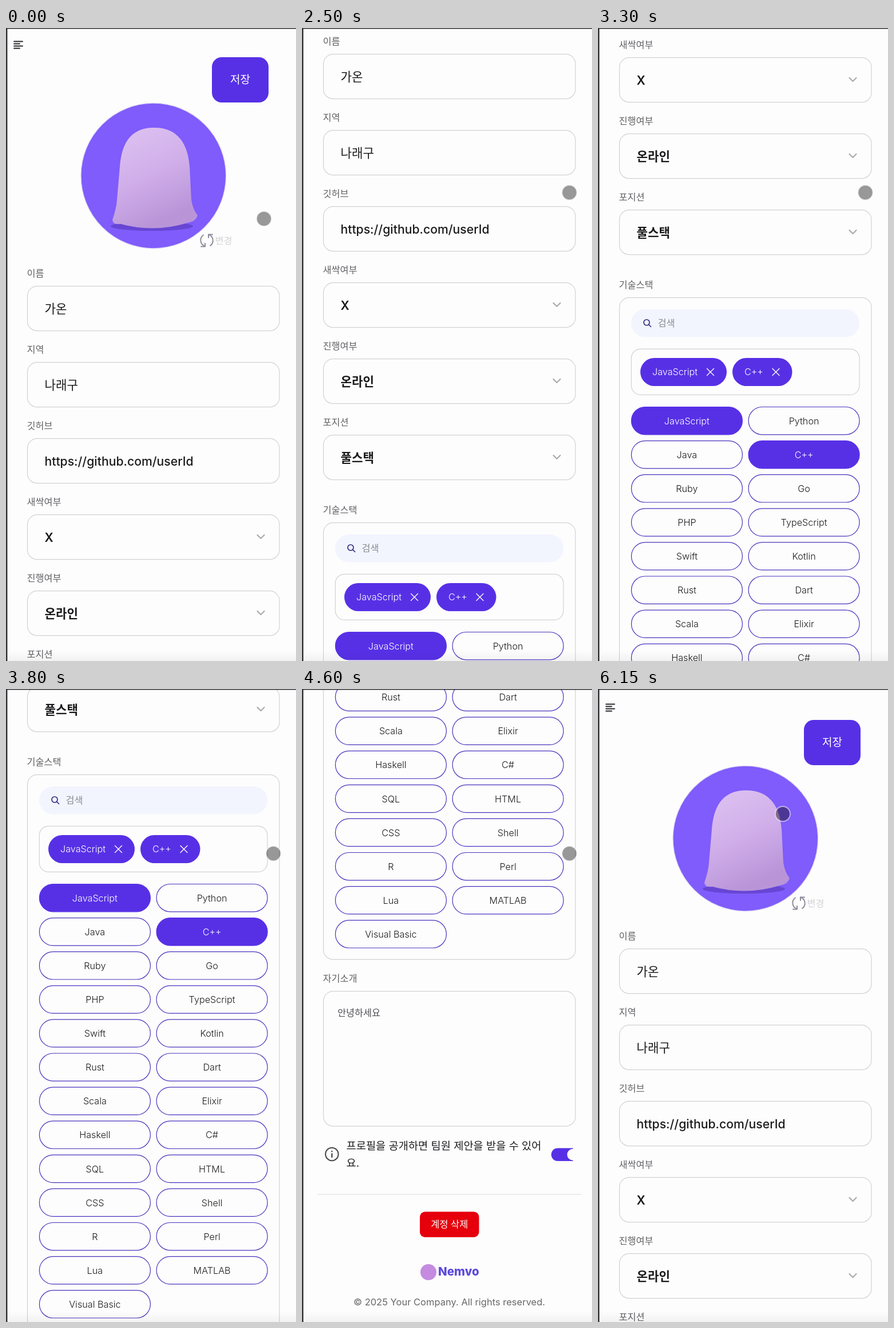
Animation of 507 by 1105 pixels, one loop 6.3 s. Source, as an HTML page:

```html
<!DOCTYPE html>
<html lang="ko">
<head>
<meta charset="utf-8">
<title>Profile form</title>
<style>
html, body { margin: 0; width: 100%; height: 100%; overflow: hidden; background: #fdfdfd; }
svg { display: block; width: 100%; height: 100%; }
text { font-family: Inter, "Noto Sans CJK KR", "Noto Sans CJK", sans-serif; }
</style>
</head>
<body>
<svg viewBox="0 0 507 1105">
  <defs>
    <linearGradient id="body" x2="0.4" y2="1">
      <stop stop-color="#dfc4f2"/><stop offset="0.55" stop-color="#d0aee9"/><stop offset="1" stop-color="#b995d8"/>
    </linearGradient>
    <linearGradient id="fade" x2="0" y2="1">
      <stop stop-opacity="0"/><stop offset="1" stop-opacity="0.045"/>
    </linearGradient>
  </defs>
  <rect width="507" height="1105" fill="#fdfdfd"/>
  <g id="page"></g>
  <rect y="1086" width="507" height="19" fill="url(#fade)"/>
  <path d="M0 0H507V1.6H2.4V1105H0Z" fill="#333136"/>
  <circle id="cursor" r="13" fill="#000" fill-opacity="0.4" stroke="#fff" stroke-opacity="0.55" stroke-width="2"/>
</svg>
<script>
const PURPLE = '#5730e6', GREY = '#d2d2d4';
const page = document.getElementById('page');
const cursor = document.getElementById('cursor');
const parts = [];

const rect = (x, y, w, h, r, fill, stroke = 'none', sw = 1.2) => parts.push(
  `<rect x="${x}" y="${y}" width="${w}" height="${h}" rx="${r}" fill="${fill}" stroke="${stroke}" stroke-width="${sw}"/>`);
const path = (d, stroke, sw, fill = 'none') => parts.push(
  `<path d="${d}" fill="${fill}" stroke="${stroke}" stroke-width="${sw}" stroke-linecap="round" stroke-linejoin="round"/>`);
const circle = (x, y, r, fill, stroke = 'none', sw = 1) => parts.push(
  `<circle cx="${x}" cy="${y}" r="${r}" fill="${fill}" stroke="${stroke}" stroke-width="${sw}"/>`);
// y is the optical middle of the line
const text = (s, x, y, size, fill, weight = 400, anchor = 'start') => parts.push(
  `<text x="${x}" y="${y + size * 0.365}" font-size="${size}" fill="${fill}" font-weight="${weight}" text-anchor="${anchor}">${s}</text>`);
const label = (s, y) => text(s, 36.5, y, 16.3, '#626266', 300);

function header() {
  path('M14 23.5H29M14 27.5H24M14 31.5H29M14 35.5H24', '#28282c', 1.8);
  rect(360, 51, 99, 79, 17, PURPLE);
  text('저장', 409.5, 90.5, 19, '#fff', 400, 'middle');
  circle(257.8, 258, 126.8, '#7f5cfb', '#dbd4f4', 1.2);
  parts.push('<ellipse cx="255" cy="346" rx="72" ry="8" fill="#6746d4"/>');
  path('M259 174C302 174 318 204 321 242L324 300Q327 318 335 327Q332 338 318 340Q259 358 200 342' +
    'Q187 344 186 335Q193 315 194 300L199 242C202 204 216 174 259 174Z', 'none', 0, 'url(#body)');
  path('M348 381A11 11 0 0 1 345 361.500M354 360.500A11 11 0 0 1 357 380', '#8f8d9c', 2);
  path('M341 381.500H348V376M361 360.500H354V366', '#8f8d9c', 2);
  text('변경', 365.5, 371, 16.3, '#d3d3d8', 300);
}

function fields() {
  const rows = [['이름', '가온'], ['지역', '나래구'], ['깃허브', 'https://github.com/userId'],
    ['새싹여부', 'X'], ['진행여부', '온라인'], ['포지션', '풀스택']];
  rows.forEach(([name, value], i) => {
    const y = 450.7 + i * 133;
    label(name, y - 22.5);
    rect(37.5, y, 440.5, 78, 17, '#fdfdfd', GREY);
    text(value, 67.5, y + 39.3, 21.2, '#1a1a1c', i > 2 ? 600 : 500);
    if (i > 2) path(`M439.500 ${y + 35.3}l6 6l6 -6`, '#ababaf', 2.2);
  });
}

function tag(name, x, w) {
  const y = 1374, cross = x + w - 28.5;
  rect(x, y, w, 49, 24.5, PURPLE);
  text(name, x + 21, y + 24.5, 16.2, '#fff', 300);
  path(`M${cross - 6} ${y + 18.5}l12 12m0 -12l-12 12`, '#fff', 1.4);
}

function stack() {
  label('기술스택', 1246);
  rect(37.5, 1268.7, 440.5, 968.5, 17, '#fdfdfd', GREY);
  rect(58, 1289, 399, 48.5, 24, '#f2f5fe');
  circle(85, 1312, 5, 'none', '#342a80', 1.7);
  path('M89 1316l3.500 3.500', '#342a80', 1.7);
  text('검색', 104.5, 1313, 16.3, '#8b8b92', 300);
  rect(58.3, 1358.3, 398.7, 80, 16, '#fdfdfd', GREY);
  tag('JavaScript', 74, 151);
  tag('C++', 235, 104.5);
  const skills = ('JavaScript,Python,Java,C++,Ruby,Go,PHP,TypeScript,Swift,Kotlin,Rust,Dart,Scala,Elixir,' +
    'Haskell,C#,SQL,HTML,CSS,Shell,R,Perl,Lua,MATLAB,Visual Basic').split(',');
  skills.forEach((name, i) => {
    const x = 58.4 + (i % 2) * 204.7, y = 1459.5 + (i >> 1) * 59.1;
    const on = name === 'JavaScript' || name === 'C++';
    rect(x, y, 194, 48.3, 24, on ? PURPLE : '#fdfdfd', on ? PURPLE : '#4b33bd');
    text(name, x + 97, y + 24.3, 16.2, on ? '#fff' : '#1c1c1e', 300, 'middle');
  });
}

function footer() {
  label('자기소개', 2270);
  rect(37.5, 2292.7, 440.5, 235.5, 17, '#fdfdfd', GREY);
  text('안녕하세요', 62, 2330, 16.3, '#505054', 500);
  circle(52.3, 2577, 11.3, 'none', '#4a4a4e', 2);
  path('M52.300 2576.500V2582M52.300 2572V2572.200', '#4a4a4e', 2.4);
  text('프로필을 공개하면 팀원 제안을 받을 수 있어', 77.5, 2562.5, 18.7, '#1f1f22');
  text('요.', 77.5, 2592, 18.7, '#1f1f22');
  path('M447 2566.500H474V2589H447A11.200 11.200 0 0 1 447 2566.500Z', 'none', 0, PURPLE);
  circle(473.5, 2577.8, 10, '#fdfdfd');
  path('M27 2647.300H488', '#e3e3e5', 1.2);
  rect(206, 2677.5, 103.5, 44.5, 9, '#e5000c');
  text('계정 삭제', 257.8, 2699.5, 16.4, '#fff', 400, 'middle');
  circle(221, 2783, 14, '#c48be0');
  text('Nemvo', 238, 2782, 20.5, '#5b49da', 800);
  text('© 2025 Your Company. All rights reserved.', 257.5, 2834.5, 16.5, '#68686c', 400, 'middle');
}

[header, fields, stack, footer].forEach(draw => draw());
page.innerHTML = parts.join('');

// [time, value, ...]
const scrollKeys = [[2200, 0], [2300, 100], [2400, 260], [2500, 405], [2600, 510], [2800, 640], [3000, 715],
  [3200, 765], [3300, 798], [3500, 905], [3800, 1119], [4300, 1545], [4400, 1640], [4600, 1765],
  [4800, 1773], [5000, 1705], [5100, 1580], [5600, 681], [5900, 50], [6000, -14], [6150, -3]];
const enterKeys = [[0, 451, 333], [100, 390, 370], [200, 270, 355], [300, 151, 250], [400, 215, 135], [500, 345, 106]];
const scrollCursor = [[1700, 506, 291], [1800, 486, 289], [1900, 467.5, 287.3]];

function at(keys, t) {
  const n = keys.findIndex(k => k[0] >= t);
  if (n < 0) return keys[keys.length - 1].slice(1);
  if (n === 0) return keys[0].slice(1);
  const a = keys[n - 1], b = keys[n], u = (t - a[0]) / (b[0] - a[0]);
  return a.slice(1).map((v, i) => v + (b[i + 1] - v) * u);
}

function cursorAt(t) {
  if (t >= 6150) return [323, 218];
  if (t >= 1300) return at(scrollCursor, t);
  return t < 600 ? at(enterKeys, t) : [-50, -50];
}

function frame(now) {
  const time = now % 6300;
  const t = time >= 6150 ? 6150 : Math.min(6000, Math.floor(time / 100) * 100);
  page.setAttribute('transform', `translate(0 ${-at(scrollKeys, t)[0]})`);
  cursor.setAttribute('transform', `translate(${cursorAt(t)})`);
  requestAnimationFrame(frame);
}
frame(0);
</script>
</body>
</html>
```
